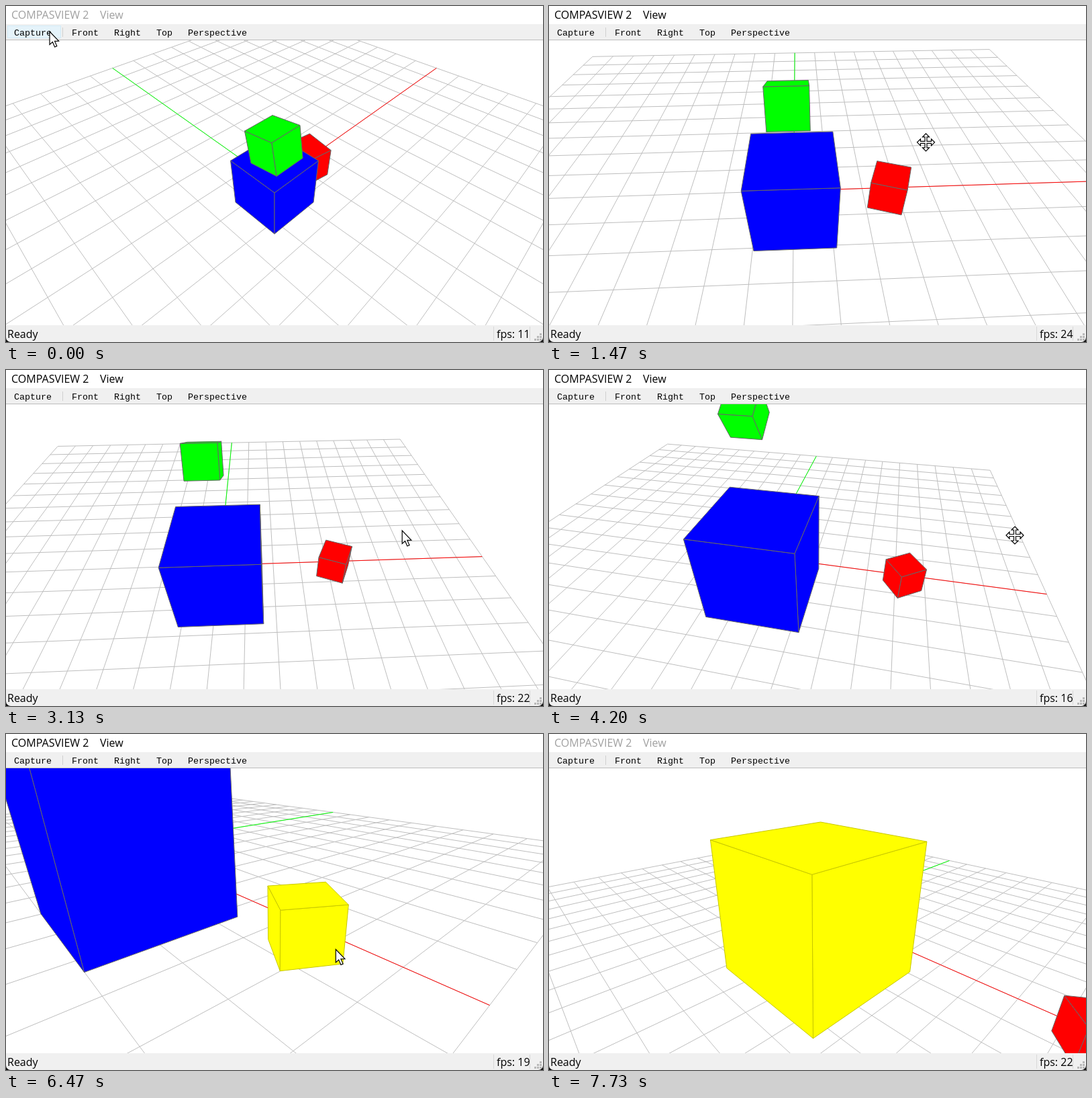
These frames come from a looping animation (800 px wide and 500 px high, 7.79 s). An HTML page with a canvas:

```html
<!DOCTYPE html>
<html lang="en">
<head>
<meta charset="utf-8">
<title>Viewer</title>
<style>
  html, body { margin: 0; width: 100%; height: 100%; overflow: hidden; background: #fff; }
  canvas { display: block; }
</style>
</head>
<body>
<canvas id="stage" width="800" height="500"></canvas>
<script>
const ctx = document.getElementById('stage').getContext('2d');
const LOOP = 7790, FOCAL = 212 / Math.tan(Math.PI / 8), NEAR = 0.1;
const UI_FONT = '16px "Open Sans", sans-serif';
const TOOL_FONT = '13.33px "Liberation Mono", monospace';
const FPS_EACH_SECOND = [11, 24, 36, 22, 16, 29, 19, 22];

// Mouse session: start, end, action, pointer dx and dy (or the distance for zoom and focus).
const SESSION = [
  [0, 330, 'move', 364, 180],
  [330, 730, 'orbit', -74, -4],
  [850, 1230, 'move', 242, -23],
  [1230, 1930, 'pan', -105, 35],
  [2010, 2330, 'zoom', 2.8],
  [2450, 4030, 'move', 227, 30],
  [4030, 4200, 'orbit', -25, -10],
  [4200, 4330, 'orbit', -19, -10],
  [4400, 4850, 'move', -118, 97],
  [5550, 5650, 'move', -23, 0],
  [5650, 5650, 'focusRed', 5.97],
  [5820, 6400, 'orbit', -42.7, -12.5],
  [6600, 6870, 'move', -231, -90],
  [7050, 7050, 'focusBlue', 12.85],
  [7050, 7400, 'move', 40, -260]
];

// Red offset, green height and both angles grow by 0.1 per timer tick.
const growth = t => Math.floor(14.9 + 0.0091 * t) / 10;

function axes({ az, el }) {
  const C = Math.cos(az), S = Math.sin(az), c = Math.cos(el), s = Math.sin(el);
  return { right: [C, S, 0], up: [-S * s, C * s, c], ahead: [-S * c, C * c, -s] };
}

const dot = (a, b) => a.reduce((sum, v, i) => sum + v * b[i], 0);

// Replays the session up to time t.
function replay(t) {
  const cam = { az: -Math.PI / 4, el: Math.PI / 4, dist: 10, target: [0, 0, 0] };
  const pointer = { x: 65, y: 38, dragging: false };
  for (const [from, to, action, a, b = 0] of SESSION) {
    if (t < from) break;
    const part = to > from ? Math.min(1, (t - from) / (to - from)) : 1;
    const dx = a * part, dy = b * part;
    if (action === 'zoom') cam.dist += dx;
    else if (action.startsWith('focus')) {
      cam.target = [action === 'focusRed' ? growth(from) : 0, 0, 0];
      cam.dist = a;
    } else {
      pointer.x += dx;
      pointer.y += dy;
      pointer.dragging = action !== 'move' && t < to + 50;
    }
    if (action === 'orbit') {
      cam.az -= dx / 100;
      cam.el += dy / 100;
    }
    if (action === 'pan') {
      const { right, up } = axes(cam), scale = cam.dist / FOCAL;
      cam.target = cam.target.map((v, i) => v + (up[i] * dy - right[i] * dx) * scale);
    }
  }
  return { cam, pointer };
}

function makeView(cam) {
  const { right, up, ahead } = axes(cam);
  return p => {
    const q = p.map((v, i) => v - cam.target[i]);
    return [dot(right, q), dot(up, q), cam.dist + dot(ahead, q)];
  };
}

const project = ([r, u, d]) => [400 + FOCAL * r / d, 263 - FOCAL * u / d];

function path(points) {
  ctx.beginPath();
  points.forEach(p => ctx.lineTo(p[0], p[1]));
}

function line3d(view, from, to, color) {
  let a = view(from), b = view(to);
  if (a[2] < b[2]) [a, b] = [b, a];
  if (a[2] < NEAR) return;
  if (b[2] < NEAR) {
    const f = (a[2] - NEAR) / (a[2] - b[2]);
    b = a.map((v, i) => v + (b[i] - v) * f);
  }
  ctx.strokeStyle = color;
  path([project(a), project(b)]);
  ctx.stroke();
}

function drawGrid(view) {
  for (let i = -10; i <= 10; i++) {
    line3d(view, [i, -10, 0], [i, 10, 0], '#bebebe');
    line3d(view, [-10, i, 0], [10, i, 0], '#bebebe');
  }
  line3d(view, [0, 0, 0], [10, 0, 0], '#f00');
  line3d(view, [0, 0, 0], [0, 10, 0], '#0f0');
}

// Rotates p about one coordinate axis.
function spin(p, axis, angle) {
  const i = (axis + 1) % 3, j = (axis + 2) % 3, q = [...p];
  q[i] = p[i] * Math.cos(angle) - p[j] * Math.sin(angle);
  q[j] = p[i] * Math.sin(angle) + p[j] * Math.cos(angle);
  return q;
}

function drawBox(view, { center, size, axis, angle, color, selected }) {
  const place = p => view(spin(p.map(v => v * size / 2), axis, angle).map((v, i) => v + center[i]));
  const middle = view(center);
  ctx.fillStyle = selected ? '#ff0' : color;
  ctx.strokeStyle = selected ? '#c8c800' : '#666';
  for (let k = 0; k < 3; k++) for (const side of [-1, 1]) {
    const at = (a, b) => {
      const p = [0, 0, 0];
      p[k] = side; p[(k + 1) % 3] = a; p[(k + 2) % 3] = b;
      return place(p);
    };
    const face = at(0, 0);
    if (dot(face, face.map((v, i) => v - middle[i])) >= 0) continue;
    path([at(-1, -1), at(1, -1), at(1, 1), at(-1, 1)].map(project));
    ctx.closePath();
    ctx.fill();
    ctx.stroke();
  }
}

function drawScene(t, view) {
  const u = growth(t);
  const boxes = [
    { center: [0, 0, 0], size: 1 + u / 2, axis: 2, angle: 0, color: '#00f', selected: t > 6850 },
    { center: [u, 0, 0], size: 1, axis: 2, angle: u, color: '#f00', selected: t > 5380 && t < 6850 },
    { center: [0, 0, u], size: 1, axis: 0, angle: u, color: '#0f0' }
  ];
  ctx.save();
  ctx.beginPath();
  ctx.rect(0, 51, 800, 424);
  ctx.clip();
  ctx.lineWidth = 1;
  ctx.lineJoin = 'round';
  drawGrid(view);
  boxes.sort((a, b) => view(b.center)[2] - view(a.center)[2]).forEach(b => drawBox(view, b));
  ctx.restore();
}

function rect(color, x, y, w, h) {
  ctx.fillStyle = color;
  ctx.fillRect(x, y, w, h);
}

function text(str, x, y, font, color = '#000') {
  ctx.font = font;
  ctx.fillStyle = color;
  ctx.fillText(str, x, y);
}

function drawChrome(t, { x, y }) {
  const titleColor = t < 300 || t > 7600 ? '#a0a0a0' : '#000';
  text('COMPASVIEW 2', 8, 19, UI_FONT, titleColor);
  text('View', 140, 19, UI_FONT, titleColor);

  rect('#f0f0f0', 0, 27, 800, 23);
  rect('#bdbdbd', 0, 50, 800, 1);
  if (x < 82 && y > 28 && y < 49) {
    rect('#d3ebf7', 2, 29, 80, 19);
    rect('#e5f3fa', 3, 30, 78, 17);
  }
  rect('#d0d0d0', 84, 32, 1, 14);
  let left = 12;
  for (const label of ['Capture', 'Front', 'Right', 'Top', 'Perspective']) {
    text(label, left, 44, TOOL_FONT);
    left += 8 * label.length + (label === 'Capture' ? 30 : 23);
  }

  rect('#111', 0, 490, 800, 10);
  ctx.fillStyle = '#f0f0f0';
  ctx.beginPath();
  ctx.roundRect(0, 475, 800, 25, [0, 0, 7, 7]);
  ctx.fill();
  rect('#d8d8d8', 726, 477, 1, 21);
  rect('#d8d8d8', 780, 477, 1, 21);
  text('Ready', 2, 494, UI_FONT);
  text('fps: ' + FPS_EACH_SECOND[Math.floor(t / 1000)], 731, 494, UI_FONT);
  for (let i = 0; i < 3; i++)
    for (let j = 0; j <= i; j++) rect('#b8b8b8', 795 - 4 * j, 487 + 4 * i, 3, 3);
}

function drawPointer({ x, y, dragging }) {
  const arrow = [[0, 0], [0, 19.5], [4.4, 15.6], [7.6, 23], [10.8, 21.6], [7.6, 14.4], [13.6, 14.2]];
  const arm = [[1.5, -1.5], [1.5, -8], [5, -8], [0, -13], [-5, -8], [-1.5, -8]];
  const turn = ([a, b], n) => n ? turn([-b, a], n - 1) : [a, b];
  const cross = [0, 3, 2, 1].flatMap(n => arm.map(p => turn(p, n)));
  ctx.save();
  ctx.translate(x, y);
  path(dragging ? cross : arrow);
  ctx.closePath();
  ctx.fillStyle = '#fff';
  ctx.strokeStyle = '#000';
  ctx.lineWidth = 1.2;
  ctx.fill();
  ctx.stroke();
  ctx.restore();
}

function draw(now) {
  const t = Math.floor((now % LOOP + 5) * 0.015) * 1000 / 15;
  const { cam, pointer } = replay(t);
  rect('#fff', 0, 0, 800, 500);
  drawScene(t, makeView(cam));
  drawChrome(t, pointer);
  drawPointer(pointer);
}

const start = performance.now();
function tick() {
  draw(performance.now() - start);
  requestAnimationFrame(tick);
}
tick();
</script>
</body>
</html>
```
